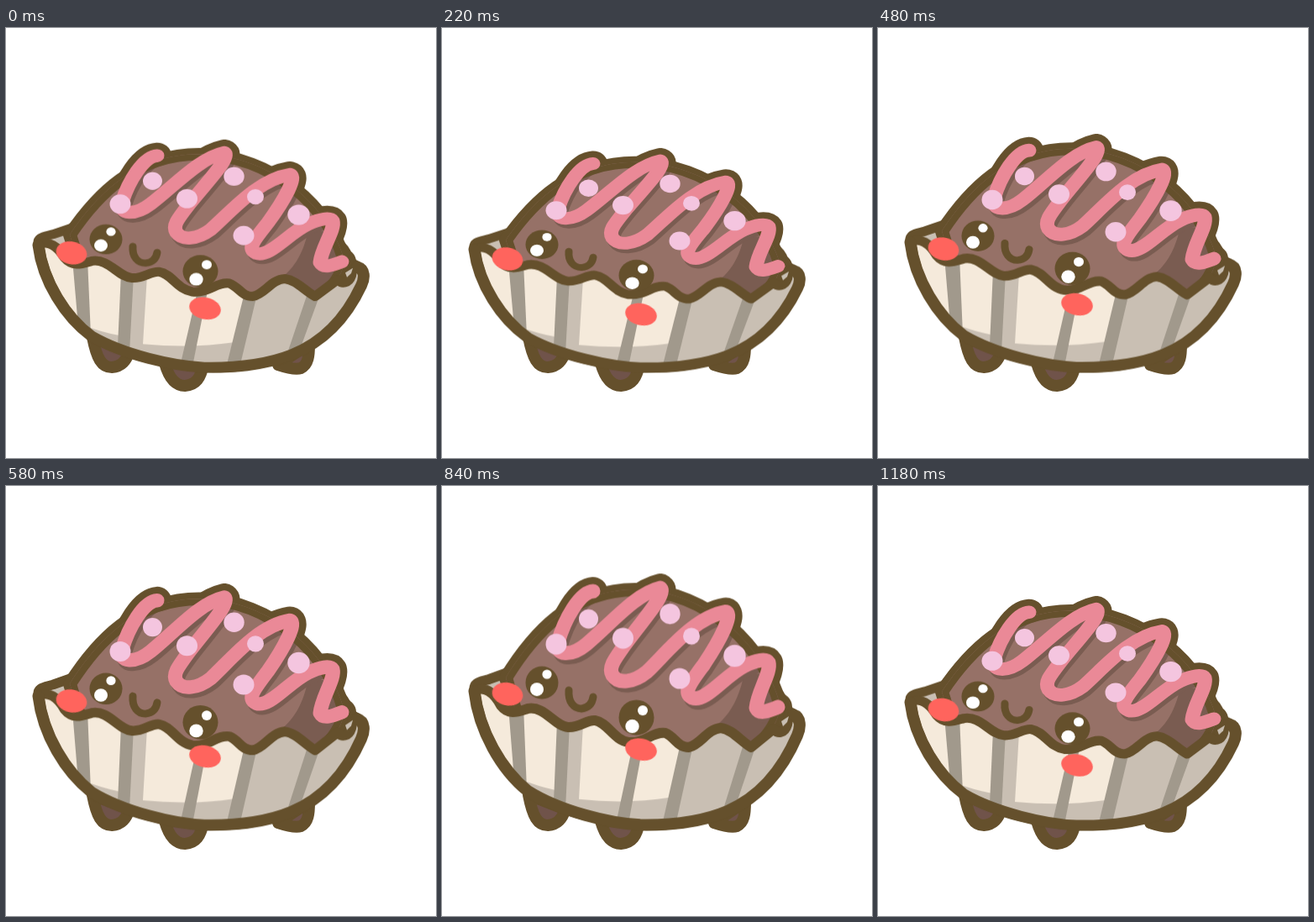
Animation, 512 px wide and 512 px high, one loop 1200 ms. Source, as an HTML page:

```html
<!DOCTYPE html>
<html lang="en">
<head>
<meta charset="utf-8">
<title>Bouncing chocolate</title>
<style>
  html, body { margin: 0; width: 100%; height: 100%; overflow: hidden; background: #fff; }
  svg { display: block; width: 100vw; height: 100vh; }

  .line { fill: none; stroke: #65502c; stroke-width: 12; stroke-linecap: round; stroke-linejoin: round; }
  .thick { stroke-width: 14; }
  .dome { stroke-width: 16; }
  .smile { stroke-width: 9; }
  .ink { fill: #65502c; }
  .choc { fill: #967167; }
  .shade { fill: #7a5c51; }
  .foot { fill: #70534a; }
  .paper { fill: #c9bfb3; }
  .cream { fill: #f5eadb; }
  .fold { fill: #a1998c; }
  .dot { fill: #f4c5df; }
  .cheek { fill: #ff645d; }
  .icing { fill: none; stroke: #ea8997; stroke-width: 17; stroke-linecap: round; stroke-linejoin: round; }
  .icing.rim { stroke: #65502c; stroke-width: 34; }
  .icing.drop { stroke: #7a5c51; }

  .body, .cup, .cheeks {
    animation: squash 600ms cubic-bezier(.364, 0, .636, 1) -994ms infinite alternate;
  }
  .body { transform-origin: 0 440px; }
  .cup { transform-origin: 0 411px; }
  .cheeks { animation-name: slide; }
  @keyframes squash { from { transform: scaleY(.884); } to { transform: none; } }
  @keyframes slide { from { transform: translateY(27.5px); } to { transform: none; } }
</style>
</head>
<body>
<svg viewBox="0 0 512 512">
  <defs>
    <path id="dome" d="M76 228C108 176 154 123 230 123C320 124 385 195 402 258C404 280 385 300 370 318L230 325L94 290Z"/>
    <path id="icing" d="M180 125C164 126 146 158 138 186C134 202 154 203 172 188C200 165 230 128 260 121C268 127 242 156 219 187C204 208 198 216 203 225C210 236 228 234 244 221C268 198 300 156 338 149.500C347 152 332 182 312 212C296 234 286 246 298 252C314 258 336 226 360 214C374 207 386 205 389 210C392 222 376 244 374 264C378 272 388 268 400 263"/>
    <path id="front" d="M39 244C50 237 62 246 70 261C80 274 92 268 102 265C122 261 134 286 150 287C164 288 172 278 182 279C198 282 204 302 222 305C242 307 250 292 266 294C278 299 280 311 294 311C308 308 316 289 332 288C346 290 356 304 368 311L395 289C399 296 408 294 411 284L413 272C428 275 427 288 423 297C408 332 384 368 340 387C305 402 268 405 236 404C200 402 140 388 103 364C72 338 45 292 39 244Z"/>
    <path id="hull" d="M418 272C428 275 427 288 423 297C408 332 384 368 340 387C305 402 268 404 236 403.500C200 402 140 387 102 363C71 338 44 292 38.500 244"/>
    <clipPath id="inDome"><use href="#dome"/></clipPath>
    <clipPath id="inFront"><use href="#front"/></clipPath>
  </defs>

  <g class="line thick">
    <path class="foot" d="M103 368C108 394 114 404 126 404C138 403 143 396 147 385Z"/>
    <path class="foot" d="M189 399C194 417 202 426 213 426C226 425 232 417 235 400Z"/>
    <path class="foot" d="M324 401C336 405 345 407 351 405C360 401 361 390 361 376Z"/>
  </g>

  <g class="cup line">
    <path class="paper" d="M38.500 244C37 233 46 233 56 230L78 222L90 260Z"/>
    <path class="ink" d="M398 244C405 251 407 258 407 264L418 271L400 290Z"/>
  </g>

  <g class="body">
    <use href="#icing" class="icing rim"/>
    <use href="#dome" class="line dome"/>
    <use href="#dome" class="choc"/>
    <g clip-path="url(#inDome)">
      <path class="shade" d="M360 222C354 252 344 270 328 284L368 318L412 280L398 225Z"/>
      <use href="#icing" class="icing drop" x="3" y="5"/>
      <use href="#dome" class="line dome"/>
    </g>
    <use href="#icing" class="icing"/>
    <g class="dot">
      <circle cx="136" cy="188" r="12.5"/>
      <circle cx="174.5" cy="158" r="11.5"/>
      <circle cx="215.5" cy="181" r="12.5"/>
      <circle cx="271.5" cy="152" r="12.2"/>
      <circle cx="297" cy="178.5" r="10"/>
      <circle cx="348.5" cy="202" r="13.2"/>
      <circle cx="283" cy="229" r="12.5"/>
    </g>
  </g>

  <g class="cup">
    <g clip-path="url(#inFront)">
      <use href="#front" class="paper"/>
      <path class="cream" d="M30 230V300L72 335Q90 352 135 362L150 230ZM169 265L163 373Q220 379 271 371L290 290Z"/>
      <g class="fold">
        <path d="M79 262H97L101 362L86 350Z"/>
        <path d="M137 280L152 282L147 384L133 376Z"/>
        <path d="M228 304H240L222 402L208 398Z"/>
        <path d="M284 306L299 308L278 404H262Z"/>
        <path d="M360 304L374 308L350 380L334 388Z"/>
      </g>
    </g>
    <use href="#front" class="line"/>
    <use href="#hull" class="line thick"/>
    <path class="paper" d="M404 280L413 274L411 281L406 286Z"/>
  </g>

  <g class="body">
    <g class="ink">
      <circle cx="119" cy="234" r="19.5"/>
      <circle cx="231.5" cy="275.5" r="21"/>
    </g>
    <g fill="#fff">
      <circle cx="125" cy="224" r="5.6"/>
      <circle cx="113" cy="242" r="8"/>
      <circle cx="239" cy="267" r="6"/>
      <circle cx="226.5" cy="286" r="8.2"/>
    </g>
    <path class="line smile" d="M151 243C150 257 157 265 166 265C175 264 179 258 180 251"/>
  </g>

  <g class="cheeks">
    <ellipse class="cheek" cx="78" cy="247.5" rx="18.5" ry="13.5" transform="rotate(12 78 247.5)"/>
    <ellipse class="cheek" cx="237" cy="313.5" rx="19" ry="13" transform="rotate(12 237 313.5)"/>
  </g>
</svg>
</body>
</html>
```
